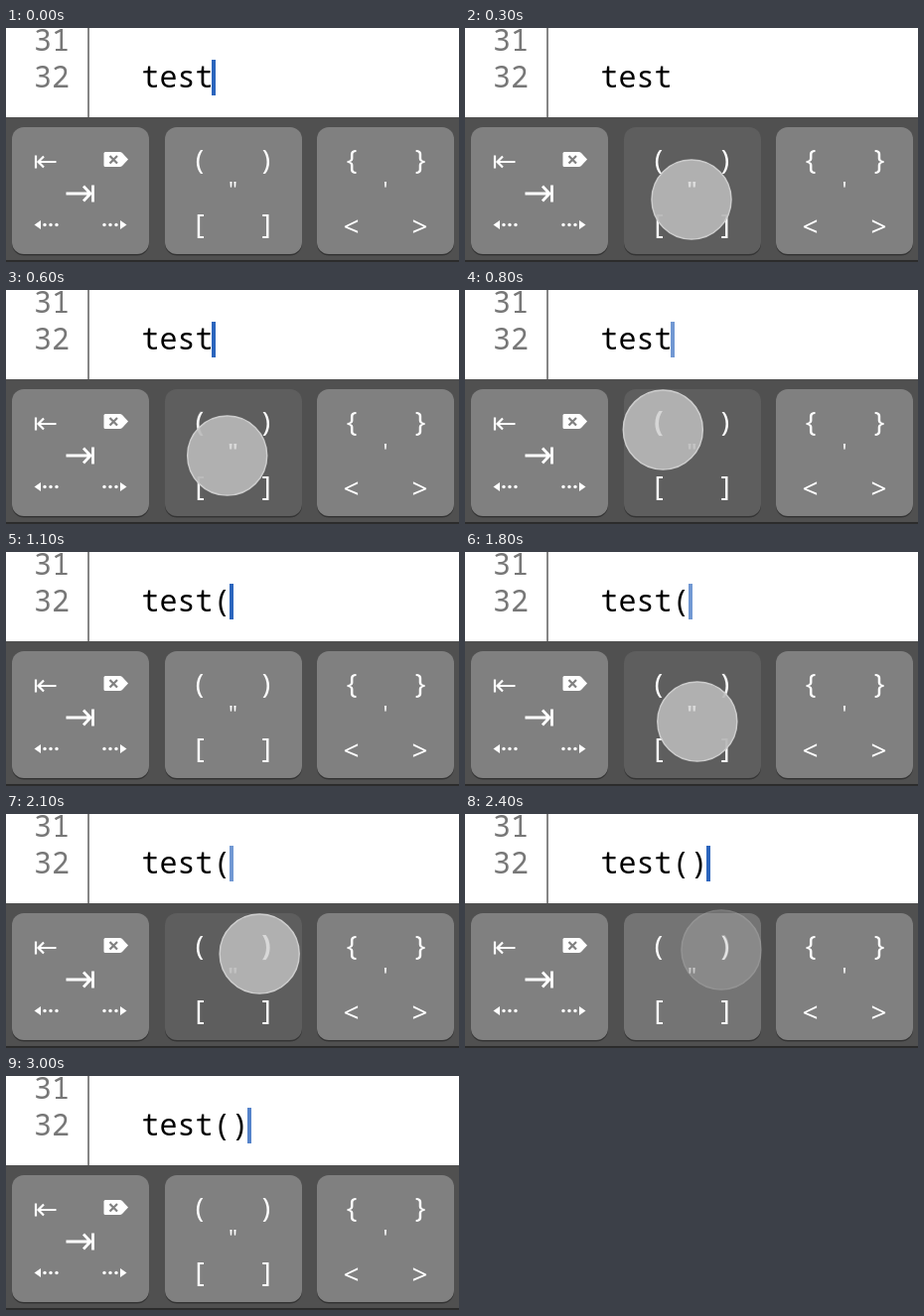
Animation of 456 by 236 pixels, one loop 4 s. Source, as an HTML page:

```html
<!DOCTYPE html>
<html lang="en">
<head>
<meta charset="utf-8">
<style>
html, body { margin: 0; width: 100%; height: 100%; overflow: hidden; background: #fff; }
svg { display: block; width: 456px; height: 236px; }
.code { font: 30px "Noto Sans Mono", monospace; }
.label { font: 28px "Noto Sans", sans-serif; fill: #fff; text-anchor: middle; }
.quote { font-size: 22px; }
.line { fill: none; stroke: #fff; stroke-width: 2.2; }
</style>
</head>
<body>
<svg viewBox="0 0 456 236">
  <rect width="456" height="236" fill="#fff"/>
  <g class="code">
    <text x="28" y="23" fill="#777">31</text>
    <text x="28" y="60" fill="#777">32</text>
    <text id="typed" x="136.5" y="60" fill="#000"></text>
  </g>
  <rect x="82" width="2" height="90" fill="#858585"/>
  <rect id="caret" y="32" width="4" height="36" fill="#2b65bd"/>
  <rect y="90" width="456" height="146" fill="#505050"/>
  <rect y="234" width="456" height="2" fill="#2c2c2c"/>
  <g id="keys"></g>
  <g fill="#fff">
    <path class="line" d="M30 128.500V141.500M32 135H50.500M38 129.500L32.500 135L38 140.500"/>
    <path d="M100 125H114.500Q116 125 117 126L123 132.500L117 139Q116 140 114.500 140H100Q98.500 140 98.500 138.500V126.500Q98.500 125 100 125Z"/>
    <path d="M104.500 129L112 136.500M112 129L104.500 136.500" stroke="#808080" stroke-width="2.200"/>
    <path class="line" style="stroke-width:2.800" d="M87.500 158.500V175.500M60.500 167H85M78 159.500L85 167L78 174.500"/>
    <path d="M28.500 198.500L35 194V203ZM121.500 198.500L115 194V203Z"/>
    <g id="dots"></g>
  </g>
  <g id="labels"></g>
  <g id="touch">
    <circle r="40" fill="#b6b6b6" fill-opacity=".93" stroke="#cdcdcd" stroke-width="1.500"/>
  </g>
  <g id="glow"></g>
</svg>
<script>
const LOOP = 4000, STEP = 100;
const $ = id => document.getElementById(id);

function add(parent, tag, attrs, text = '') {
  const el = document.createElementNS('http://www.w3.org/2000/svg', tag);
  for (const k in attrs) el.setAttribute(k, attrs[k]);
  el.textContent = text;
  return parent.appendChild(el);
}

const keys = [6, 160, 313].map(x => {
  add($('keys'), 'rect', { x, y: 101.5, width: 138, height: 128, rx: 12, fill: '#343434' });
  return add($('keys'), 'rect', { x, y: 100, width: 138, height: 128, rx: 12, fill: '#808080' });
});
for (const x of [39, 45, 51, 99, 105, 111])
  add($('dots'), 'circle', { cx: x, cy: 198.5, r: 1.7 });

const label = (s, x, y, quote) =>
  add($('labels'), 'text', { x, y, class: quote ? 'label quote' : 'label' }, s);
label('(', 195, 143);
label(')', 262, 143);
label('[', 195, 208);
label(']', 262, 208);
const quote = label('"', 228.5, 171, true);
label('{', 348, 143);
label('}', 417, 143);
label('<', 347.5, 210);
label('>', 416.5, 210);
label("'", 382, 171, true);

// The label being picked shines through the touch spot
const glow = (s, x, y, cls = 'label') =>
  add($('glow'), 'text', { x, y, class: cls, style: 'font-weight:700;fill:#dcdcdc' }, s);
const glows = {
  quote: glow('"', 228.5, 170, 'label quote'),
  open: glow('(', 195, 143),
  close: glow(')', 262, 143)
};

const swipes = [
  { down: 200, move: 500, end: 900, up: 1000, from: [228, 173], to: [194, 135], pick: 'open' },
  { down: 1400, move: 1700, end: 2200, up: 2400, from: [231, 175], to: [258, 137], pick: 'close' }
];

const clamp = v => Math.max(0, Math.min(1, v));
const ease = v => v * v * (3 - 2 * v);
const mix = (a, b, k) => a + (b - a) * k;

// Caret: solid, quick fade out, quick fade in; typing restarts it
function blink(t) {
  const p = t % 600;
  return p <= 150 ? 1 : p < 300 ? clamp((300 - p) / 150) : p < 400 ? 0 : clamp((p - 400) / 150);
}

function draw(time) {
  const t = Math.min(3000, Math.floor(time % LOOP / STEP) * STEP);
  const chars = t < 1000 ? 'test' : t < 2400 ? 'test(' : 'test()';
  const start = t < 1000 ? 0 : t < 2400 ? 1000 : 2480;
  $('typed').textContent = chars;
  $('caret').setAttribute('x', 135 + chars.length * 18);
  $('caret').setAttribute('opacity', blink(Math.max(0, t - start)));

  const s = swipes.find(w => t >= w.down && t < w.up + STEP);
  const on = !s ? 0 : t < s.down + STEP ? 0.6 : t < s.up ? 1 : 0.35;
  const k = s ? ease(clamp((t - s.move) / (s.end - s.move))) : 0;
  const grey = Math.round(mix(128, 94, on));
  keys[1].setAttribute('fill', `rgb(${grey},${grey},${grey})`);
  $('touch').setAttribute('opacity', on);
  if (s) {
    const [x, y] = s.from.map((v, i) => mix(v, s.to[i], k));
    $('touch').setAttribute('transform', `translate(${x} ${y})`);
  }
  quote.setAttribute('opacity', 1 - on);
  for (const name in glows) {
    const amount = !s ? 0 : name === 'quote' ? 1 - 0.65 * k : name === s.pick ? k : 0;
    glows[name].setAttribute('opacity', amount * on);
  }
}

function tick(now) {
  draw(now);
  requestAnimationFrame(tick);
}
draw(0);
requestAnimationFrame(tick);
</script>
</body>
</html>
```
